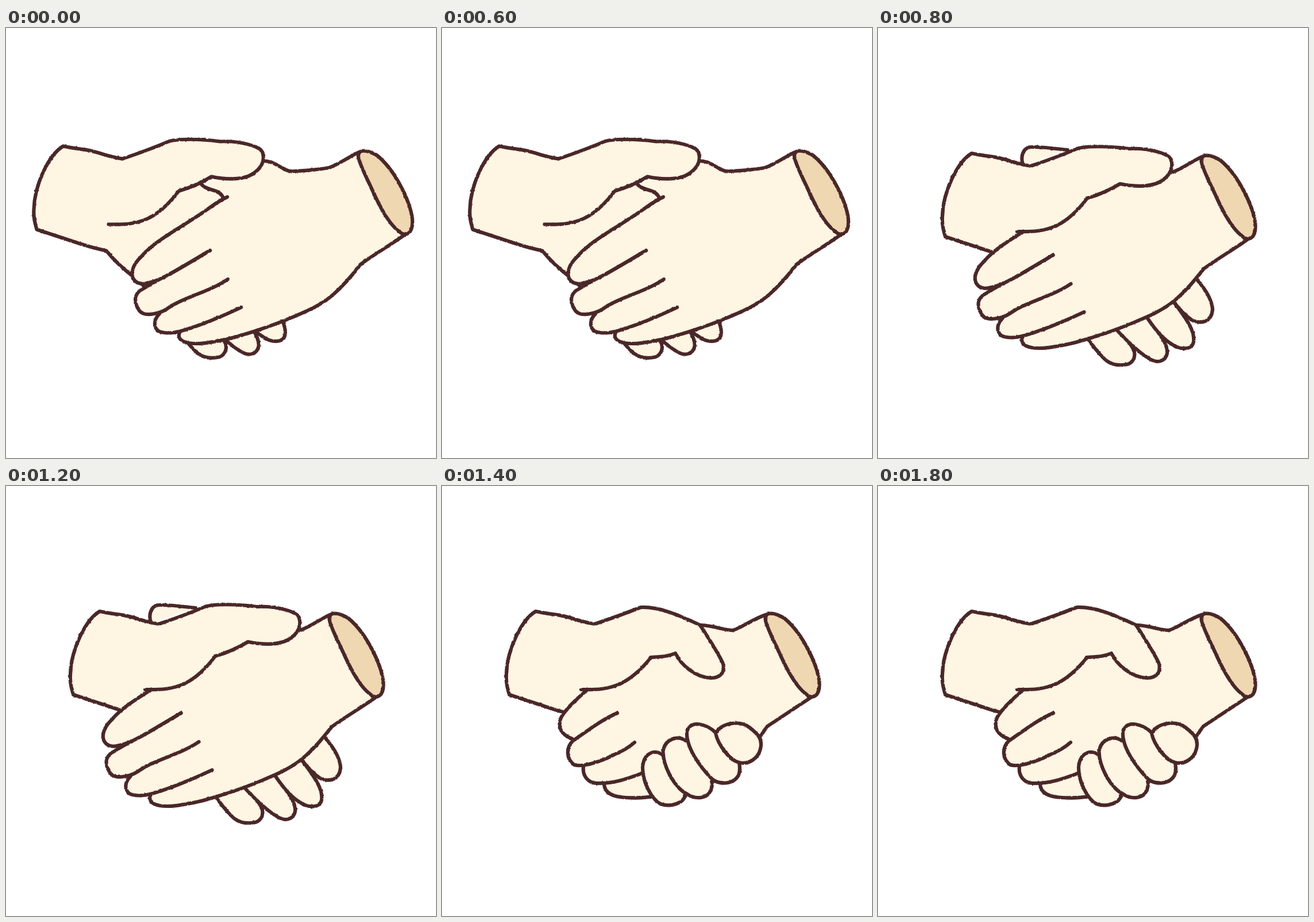
Animation of 748x748 px, one loop 2600 ms. Source, as an HTML page:

```html
<!DOCTYPE html>
<html lang="en">
<head>
<meta charset="utf-8">
<title>Handshake</title>
<style>
  html, body { margin: 0; width: 100%; height: 100%; overflow: hidden; background: #fff; }
  svg { display: block; width: 100%; height: 100%; }
  path { fill: #fff5e3; stroke: #4a2728; stroke-width: 6.2; stroke-linecap: round; stroke-linejoin: round; }
  .flat { stroke: none; }
  .line { fill: none; }
  .cut { fill: #efd7b2; }
</style>
</head>
<body>
<svg viewBox="0 0 748 748">
  <defs>
    <filter id="rough" filterUnits="userSpaceOnUse" x="-20" y="-20" width="800" height="800" color-interpolation-filters="sRGB">
      <feTurbulence type="fractalNoise" baseFrequency="0.2" numOctaves="2" seed="4" result="noise"/>
      <feDisplacementMap in="SourceGraphic" in2="noise" scale="2.5" xChannelSelector="R" yChannelSelector="G"/>
    </filter>

    <!-- left hand: fingers behind, arm, thumb in front -->
    <g id="leftTips">
      <path d="M365 541C376 556 390 573 398 579C410 588 424 587 434 585C446 581 449 568 444 558C439 548 428 538 416 525"/>
      <path d="M415 525C430 541 452 563 470 574C486 585 500 580 503 566C505 548 484 524 467 502"/>
      <path d="M467 502C480 522 496 541 511 550C525 560 546 561 549 546C552 525 533 502 514 476"/>
      <path d="M514 476C524 489 535 501 546 508C560 515 580 513 582 490C581 472 570 455 555 438"/>
    </g>
    <g id="leftArm">
      <path class="flat" d="M263 252L404 280L441 309L298 440Z"/>
      <path d="M303 461L285 445C268 432 252 417 238 400C220 396 205 392 190 387L117 363C114 352 111 342 112 328C113 285 138 233 163 218C190 224 205 223 222 229C236 233 250 238 266 240"/>
    </g>
    <path id="leftThumb" d="M266 240C290 232 318 222 346 210C360 205 400 205 436 210C470 208 509 219 510 230C514 243 508 255 496 264C480 277 448 277 421 271C405 281 385 290 364 296C350 315 330 335 310 344C290 353 270 355 242 354"/>

    <!-- right hand -->
    <path id="rightThumb" d="M303 231C297 214 304 199 318 199C340 199 360 202 380 204"/>
    <g id="rightPalm">
      <path class="flat" d="M440 245L345 270L385 296L240 425L245 480L285 515L320 540L480 505L605 405L600 235L500 260Z"/>
      <path d="M446 231C462 231 470 238 480 243C490 249 495 250 502 249C525 248 545 246 562 243C580 237 598 223 614 216L693 360C668 378 640 394 617 411C604 428 588 447 570 463C546 484 520 494 489 507C450 523 400 538 381 542C355 547 335 551 318 548C303 545 297 538 303 528"/>
      <path d="M267 497C257 507 256 520 265 527C275 532 290 531 305 527C340 517 375 502 409 486"/>
      <path d="M385 294C375 298 365 305 355 312C310 345 260 368 235 398C220 412 216 428 222 437C228 446 238 446 248 443C262 440 270 437 285 428C305 417 330 402 355 387"/>
      <path d="M355 387C330 402 305 417 285 428C265 438 250 446 238 454C225 460 222 472 228 485C233 497 242 500 258 497C275 494 280 488 290 482C320 465 355 458 386 437"/>
      <path class="line" d="M340 272C350 284 372 279 378 296"/>
    </g>
    <path id="cuff" class="cut" d="M613 224C612 209 629 212 646 222C680 250 708 312 707 338C707 356 696 365 684 354C662 338 644 297 634 275C624 254 614 234 613 224Z"/>
  </defs>

  <g id="reach">
    <g filter="url(#rough)">
      <g class="right"><use href="#rightThumb"/></g>
      <g class="left"><use href="#leftTips"/><use href="#leftArm"/></g>
      <g class="right"><use href="#rightPalm"/><use href="#cuff"/></g>
      <g class="left"><use href="#leftThumb"/></g>
    </g>
  </g>

  <g id="grip">
    <g filter="url(#rough)">
      <use href="#leftArm"/>
      <path class="flat" d="M300 300L210 405L230 470L260 505L300 535L362 539L540 430L560 415L600 340L560 245L450 260Z"/>
      <path d="M449 242C470 242 490 251 506 251C520 247 540 232 563 224L643 367L566 418C560 425 558 431 553 436"/>
      <path d="M252 355C235 370 215 388 207 403C201 420 206 432 227 440"/>
      <path d="M282 519C283 535 300 541 320 542C335 543 355 542 365 540"/>
      <path d="M246 488C244 505 255 518 272 517C300 518 325 508 350 499"/>
      <path d="M305 395C280 405 250 428 228 443C215 455 216 475 230 485C245 490 280 478 300 467C312 462 325 455 335 446"/>
      <path d="M266 240C290 232 318 222 346 211C380 210 415 226 449 242C462 262 480 290 488 307C494 322 485 334 468 334C440 333 415 310 406 291C392 297 378 297 364 298C350 315 330 335 310 344C290 353 270 355 242 354"/>
      <path d="M384 468C372 458 352 462 349 488C348 515 365 545 380 553C400 560 422 550 423 537"/>
      <path d="M424 443C410 433 390 440 385 458C382 485 405 525 425 535C440 546 462 545 468 528C471 520 470 515 470 511"/>
      <path d="M476 429C462 415 432 405 426 427C424 455 450 490 470 510C480 518 505 522 516 503C519 494 518 487 517 482"/>
      <path d="M476 430C488 410 520 408 535 420C550 432 558 440 554 457C550 475 532 485 517 481C500 477 480 450 476 430Z"/>
      <use href="#cuff" transform="translate(-50.5 8)"/>
    </g>
  </g>
</svg>
<script>
  const STEP = 200;
  const reach = document.getElementById('reach');
  const grip = document.getElementById('grip');

  // pose: which drawing, how far the hands have slid together, shake offset
  const pose = (group, slide, x = 0, y = 0) => ({ group, slide, x, y });
  const apart = pose(reach, 0), apartDown = pose(reach, 0, 6, 39.5);
  const close = pose(reach, 1), closeDown = pose(reach, 1, 2, 38);
  const held = pose(grip, 1), heldDown = pose(grip, 1, 4.5, 30);
  const steps = [
    apart, apart, apartDown, apart,
    close, closeDown, close,
    held, heldDown, held, held, held, held
  ];

  function place(nodes, x, y) {
    for (const node of nodes) node.setAttribute('transform', `translate(${x} ${y})`);
  }

  let shown;
  function render(ms) {
    const now = steps[Math.floor(ms / STEP) % steps.length];
    if (now === shown) return;
    shown = now;
    for (const g of [reach, grip]) g.style.display = g === now.group ? '' : 'none';
    place([now.group], now.x, now.y);
    place(reach.querySelectorAll('.left'), -63.5 * (1 - now.slide), -12.5 * (1 - now.slide));
    place(reach.querySelectorAll('.right'), -50.5 * now.slide, 8 * now.slide);
  }

  const start = performance.now();
  function tick() {
    render(performance.now() - start);
    requestAnimationFrame(tick);
  }
  tick();
</script>
</body>
</html>
```
